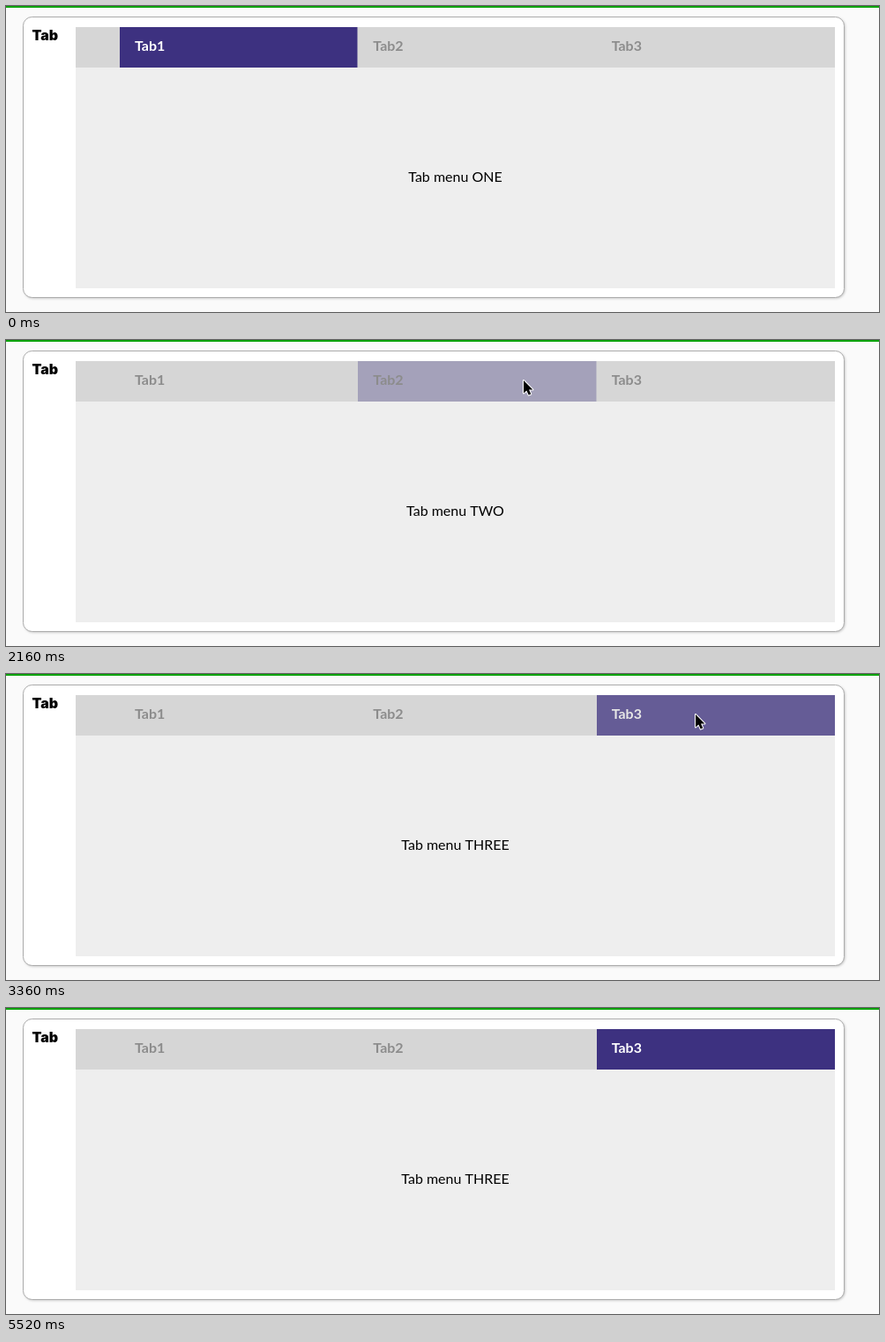
These frames come from a looping animation (990 by 348 pixels, 5600 ms). An HTML page with a canvas:

```html
<!DOCTYPE html>
<html lang="en">
<head>
<meta charset="utf-8">
<title>Tab menu</title>
<style>
  html, body { margin: 0; width: 100%; height: 100%; overflow: hidden; background: #fafafa; }
  canvas { display: block; }
</style>
</head>
<body>
<canvas id="stage" width="990" height="348"></canvas>
<script>
const ctx = document.getElementById('stage').getContext('2d');
const LOOP = 5600, STEP = 80, FADE = 540;
const TAB_WIDTH = 270.33;
const tabs = [
  { word: 'ONE', start: -LOOP },
  { word: 'TWO', start: 1985 },
  { word: 'THREE', start: 2960 }
];
// Pointer stops: time, x, y
const stops = [
  [80, 400, 300], [640, 505, 62], [1200, 589, 49], [1840, 589, 49],
  [2000, 587, 46], [2160, 587, 46], [2760, 782, 46], [3460, 782, 46]
];
const arrow = new Path2D('M0 0V14.5L3.4 11.4L5.7 16.6L8.3 15.5L6 10.4H10.4Z');
const beam = new Path2D('M-3 -6.5Q0 -6.5 0 -4.5Q0 -6.5 3 -6.5M0 -4.5V4.5M-3 6.5Q0 6.5 0 4.5Q0 6.5 3 6.5M-1.5 2.5H1.5');

const clamp = v => Math.max(0, Math.min(1, v));
const smooth = v => v * v * (3 - 2 * v);
const mix = (a, b, k) => `rgb(${a.map((v, i) => Math.round(v + (b[i] - v) * k))})`;

function rect(color, x, y, w, h) {
  ctx.fillStyle = color;
  ctx.fillRect(x, y, w, h);
}

function text(str, x, y, font, color, align = 'left') {
  ctx.font = font;
  ctx.fillStyle = color;
  ctx.textAlign = align;
  ctx.fillText(str, x, y);
}

function pointerAt(t) {
  if (t < stops[0][0]) return null;
  const next = stops.findIndex(s => s[0] > t);
  if (next < 0) {
    const d = t - 3460;
    return [782 + d * 0.12, 46 + d * d * 0.003];
  }
  const [t0, x0, y0] = stops[next - 1], [t1, x1, y1] = stops[next];
  const k = smooth((t - t0) / (t1 - t0));
  return [x0 + (x1 - x0) * k, y0 + (y1 - y0) * k];
}

function drawPointer(t) {
  const pos = pointerAt(t);
  if (!pos || pos[1] > 348) return;
  const [x, y] = pos;
  const overLabel = x > 686 && x < 721 && y < 60;
  ctx.save();
  ctx.translate(Math.round(x), Math.round(y));
  ctx.lineJoin = 'round';
  if (overLabel) ctx.translate(0.5, 3.5);
  ctx.strokeStyle = '#fff';
  ctx.lineWidth = 2;
  ctx.stroke(overLabel ? beam : arrow);
  if (overLabel) {
    ctx.strokeStyle = '#222';
    ctx.lineWidth = 1;
    ctx.stroke(beam);
  } else {
    ctx.fillStyle = '#000';
    ctx.fill(arrow);
  }
  ctx.restore();
}

function drawCard() {
  rect('#fafafa', 0, 0, 990, 348);
  rect('#0aa30a', 0, 0, 990, 2);
  ctx.save();
  ctx.beginPath();
  ctx.roundRect(19.5, 12.5, 931, 319, 10);
  ctx.shadowColor = 'rgba(0,0,0,.25)';
  ctx.shadowBlur = 3;
  ctx.shadowOffsetX = ctx.shadowOffsetY = 1;
  ctx.fillStyle = '#fff';
  ctx.fill();
  ctx.restore();
  ctx.strokeStyle = '#adadad';
  ctx.lineWidth = 1;
  ctx.stroke();
  text('Tab', 29.5, 39, '900 16px Inter, sans-serif', '#000');
  rect('#d6d6d6', 79, 24, 861, 46);
  rect('#eee', 79, 70, 861, 251);
}

function draw(t) {
  drawCard();
  const active = tabs.findLastIndex(tab => t >= tab.start);
  tabs.forEach((tab, i) => {
    const x = 129 + i * TAB_WIDTH;
    const k = i === active ? clamp((t - tab.start) / FADE) : 0;
    const left = Math.round(x), right = Math.round(x + TAB_WIDTH);
    if (k) rect(mix([214, 214, 214], [61, 49, 128], k), left, 24, right - left - (i < 2 ? 0.5 : 0), 46);
    const label = mix([140, 140, 140], [255, 255, 255], clamp((k - 0.35) / 0.5));
    text('Tab' + (i + 1), x + 17, 51, '700 16px Lato, sans-serif', label);
  });
  text('Tab menu ' + tabs[active].word, 509.5, 200, '16px Lato, sans-serif', '#000', 'center');
  drawPointer(t);
}

function tick() {
  const t = performance.now() % LOOP;
  draw(Math.floor(t / STEP) * STEP);
  requestAnimationFrame(tick);
}
tick();
</script>
</body>
</html>
```
